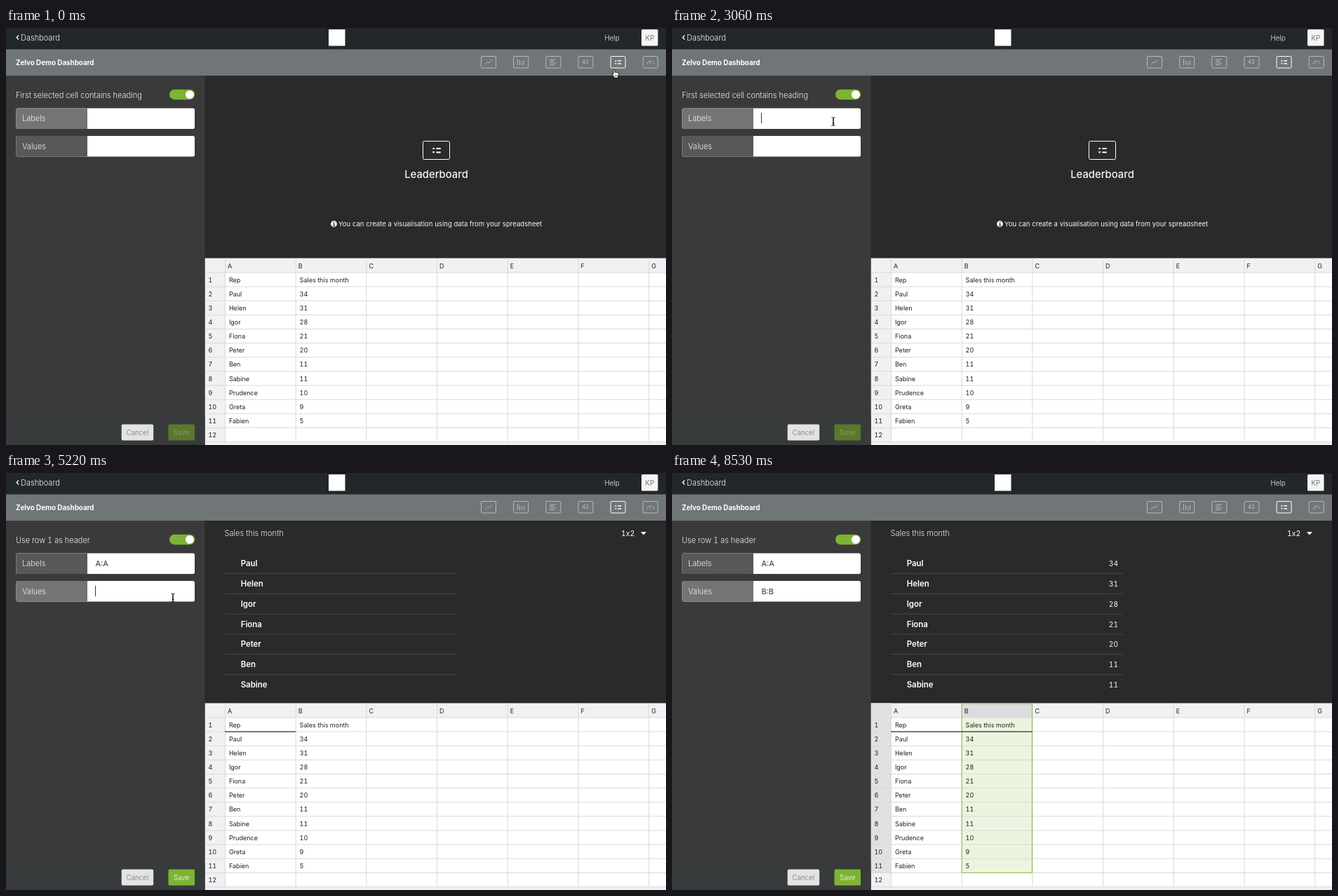
Write an HTML page that moves like this. It is 941x595 px and loops after 8.87 s.

```html
<!DOCTYPE html>
<html lang="en">
<head>
<meta charset="utf-8">
<title>Leaderboard set-up</title>
<style>
html, body { margin: 0; width: 100%; height: 100%; overflow: hidden; background: #2a2a2a; }
svg { display: block; width: 941px; height: 595px; }
text { font-family: Inter, "Liberation Sans", sans-serif; white-space: pre; }
.num { font-feature-settings: "tnum"; }
</style>
</head>
<body>
<svg id="stage" viewBox="0 0 941 595" xmlns="http://www.w3.org/2000/svg"></svg>
<script>
const LOOP = 8870;
const PICK_LABELS = 4010, FOCUS_VALUES = 5160, PICK_VALUES = 6310;
const people = [
  ['Paul', 34], ['Helen', 31], ['Igor', 28], ['Fiona', 21], ['Peter', 20], ['Ben', 11],
  ['Sabine', 11], ['Prudence', 10], ['Greta', 9], ['Fabien', 5]
];
const GREEN = '#7db433', LIGHT = '#747474', DARK = '#585858';

const rect = (x, y, w, h, fill, extra = '') =>
  `<rect x="${x}" y="${y}" width="${w}" height="${h}" fill="${fill}" ${extra}/>`;
const path = (d, stroke, width = 1, extra = '') =>
  `<path d="${d}" fill="none" stroke="${stroke}" stroke-width="${width}" ${extra}/>`;
const shape = (d, fill, extra = '') => `<path d="${d}" fill="${fill}" ${extra}/>`;
// Text is placed by the vertical middle of its capitals.
const label = (x, middle, str, size, fill, weight = 400, extra = '') =>
  `<text x="${x}" y="${(middle + size * 0.364).toFixed(2)}" font-size="${size}" fill="${fill}" font-weight="${weight}" ${extra}>${str}</text>`;
const group = (id, content) => `<g id="${id}">${content}</g>`;
const times = (n, fn) => Array.from({ length: n }, (_, i) => fn(i)).join('');
const centred = 'text-anchor="middle"';

const SHEET_TOP = 328.4;
const colX = i => 312.5 + i * 100.7;
const rowY = i => 349 + i * 20.13;
const rowMiddle = i => 359.3 + i * 20.15;

function leaderIcon(cx, cy, s, fill) {
  const p = (x, y) => `${cx + x * s} ${cy + y * s}`;
  const bar = y => rect(cx - 0.2 * s, cy + y * s, 6.4 * s, 2 * s, fill);
  return shape(`M${p(-6, -1.5)}L${p(-4, -4.3)}L${p(-2, -1.5)}ZM${p(-6, 1.6)}L${p(-4, 4.4)}L${p(-2, 1.6)}Z`, fill)
    + bar(-3.6) + bar(1.8);
}

function toolbar() {
  const grey = '#b6bbbc';
  const box = i => rect(677.5 + i * 46.15, 40.5, 21, 16.5, 'none',
    `rx="1.5" stroke="${i === 4 ? '#fff' : grey}"`);
  return times(6, box)
    + path('M683 52L686.5 48.5L689 49.5L693 45.5', grey)
    + times(4, i => path(`M${729.5 + i * 3} ${[44, 46, 48, 46][i]}V53`, grey))
    + times(4, i => path(`M775 ${45 + i * 2.5}h${[9, 6, 9, 7][i]}`, grey))
    + label(826, 48.7, '42', 7.5, grey, 500, centred)
    + leaderIcon(872.4, 48.8, 0.75, '#fff')
    + path('M914 52A5 5 0 0 1 924 52M919 51.5L917 48.5', grey, 0.9);
}

function header() {
  return rect(0, 0, 941, 31, '#22272a') + rect(0, 30.5, 941, 37.5, '#707677')
    + path('M18 10.5L15.2 13.5L18 16.5', '#fff', 1.3)
    + label(21, 13.5, 'Dashboard', 11, '#f4f4f4', 300)
    + rect(460, 2, 23.5, 23.5, '#fff')
    + label(853.5, 14, 'Help', 9.9, '#f0f0f0', 300)
    + rect(906, 2, 23.5, 23.5, '#f5f5f5', 'rx="1.5"')
    + label(917.8, 14, 'KP', 10, '#555', 300, centred)
    + label(14, 49.7, 'Zelvo Demo Dashboard', 9.8, '#fff', 700)
    + toolbar();
}

function field(id, y, name) {
  return rect(14.4, y, 254.6, 29.4, '#fff', 'rx="2.5"')
    + shape(`M116 ${y}H16.9a2.5 2.5 0 0 0-2.5 2.5v24.4a2.5 2.5 0 0 0 2.5 2.5H116Z`, DARK, `id="${id}Tile"`)
    + label(23, y + 14.6, name, 11, '#f0f0f0', 300);
}

function sidebar() {
  return rect(0, 68, 283.5, 527, '#3a3a3a') + rect(0, 556, 283.5, 39, '#373b3b')
    + group('headingBefore', label(14, 96, 'First selected cell contains heading', 11, '#ededed', 300))
    + group('headingAfter', label(14, 96, 'Use row 1 as header', 11, '#ededed', 300, 'class="num"'))
    + rect(233, 87.7, 36.2, 14.5, GREEN, 'rx="7.2"') + '<circle cx="261.9" cy="95" r="6" fill="#fff"/>'
    + field('labels', 114.5, 'Labels') + field('values', 154, 'Values')
    + group('labelsText', label(127.5, 129, 'A:A', 11, '#333'))
    + group('valuesText', label(127.5, 168.7, 'B:B', 11, '#333'))
    + rect(127, 121, 1, 15, '#333', 'id="caret"')
    + rect(164.7, 565.5, 45.5, 23, '#e3e3e3', 'rx="2"')
    + label(187.4, 577, 'Cancel', 9.8, '#777', 300, centred)
    + group('saveOff', rect(231.5, 565.5, 37.5, 23, '#5a782e', 'rx="2"')
      + label(250.2, 577, 'Save', 9.8, '#91a56d', 300, centred))
    + group('saveOn', rect(231.5, 565.5, 37.5, 23, GREEN, 'rx="2"')
      + label(250.2, 577, 'Save', 9.8, '#fff', 300, centred));
}

function preview() {
  const middle = i => 129 + i * 28.8;
  const intro = rect(594.5, 161.5, 38, 26, 'none', 'rx="2" stroke="#fff"')
    + leaderIcon(613.6, 174.6, 1, '#fff')
    + label(613.5, 208.5, 'Leaderboard', 14.8, '#f5f5f5', 500, centred)
    + '<circle cx="467.5" cy="279.5" r="4.4" fill="#fff"/>'
    + path('M467.6 276.3v1.4M466.4 279h1.3v3M466.2 282.2h2.8', '#2a2a2a', 1.2)
    + label(474, 279.5, 'You can create a visualisation using data from your spreadsheet', 9.6, '#f5f5f5');
  const board = label(311.5, 85.5, 'Sales this month', 11, '#e8e8e8', 300)
    + label(877, 86, '1x2', 10.4, '#fff', 400, 'class="num"')
    + shape('M905 84h8l-4 4.5Z', '#fff')
    + times(7, i => label(334.7, middle(i), people[i][0], 11.4, '#fff', 600))
    + times(6, i => path(`M312 ${143.5 + i * 28.8}H643`, '#474747'));
  const scores = times(7, i =>
    label(636, middle(i) + 0.5, people[i][1], 10.2, '#f5f5f5', 400, 'class="num" text-anchor="end"'));
  return rect(283.5, 68, 658, 261, '#2a2a2a')
    + group('intro', intro) + group('board', board) + group('scores', scores);
}

function sheet() {
  const ink = '#222', line = '#d9d9d9';
  const cells = [['Rep', 'Sales this month'], ...people];
  const bottom = rowY(11);
  const selection = col => group('select' + col,
    rect(283.5, SHEET_TOP, 29, bottom - SHEET_TOP, '#e1e1e4')
    + rect(colX(col), SHEET_TOP, 100.5, 349 - SHEET_TOP, '#dcdce0')
    + rect(colX(col), 349, 100.5, bottom - 349, '#ecf4df'));
  const outline = col => rect(colX(col), 329, 100.2, bottom - 329, 'none',
    `id="outline${col}" stroke="#8abb4a"`);
  return rect(283.5, SHEET_TOP, 658, 267, '#f1f1f3')
    + rect(312.5, 349, 629, rowY(12) - 349, '#fff')
    + selection(0) + selection(1)
    + times(13, i => path(`M283.5 ${rowY(i)}H941`, line))
    + times(7, i => path(`M${colX(i)} ${SHEET_TOP}V${rowY(12)}`, line))
    + times(7, i => label(colX(i) + 3.5, 339.3, 'ABCDEFG'[i], 9, ink))
    + times(12, i => label(288.5, rowMiddle(i), i + 1, 9, ink, 400, 'class="num"'))
    + cells.map((row, i) => row.map((v, col) =>
        label(colX(col) + 5.4, rowMiddle(i), v, 9.05, ink, 400, 'class="num"')).join('')).join('')
    + outline(0) + outline(1)
    + group('rule0', path('M312 369.2H413', '#333', 1.3))
    + group('rule1', path('M413 369.2H513.5', '#333', 1.3));
}

const tooltip = group('tooltip', rect(872.3, 66.7, 56.5, 13.8, '#ececec', 'stroke="#bbb" stroke-width=".5"')
  + label(876, 73.7, 'Leaderboard', 7.9, '#222'));

const pointers = group('arrow',
    '<path d="M0 0V11L2.6 8.6L4.2 12.4L6 11.6L4.4 8H7.8Z" fill="#000" stroke="#fff" stroke-width=".9"/>')
  + group('beam', path('M-2.5-6Q0-6 0-4.5V4.5Q0 6-2.5 6M2.5-6Q0-6 0-4.5V4.5Q0 6 2.5 6M-1.3 2.5H1.3', '#111', 1))
  + group('hand', '<path d="M-1 1Q0-.8 1 1V4.5L2.2 4L3.4 4.7L4.6 4.4L5.6 5.2L6.7 5.4V8L5.6 10.3V12H-.2V10.6L-3 6.8Q-2.6 5.4-1 7Z" fill="#fff" stroke="#000" stroke-width=".8"/>'
    + path('M1.6 8v2M3.2 8v2M4.8 8v2', '#000', 0.6));

const stage = document.getElementById('stage');
stage.innerHTML = preview() + sheet() + sidebar() + header() + tooltip + pointers;
const el = id => document.getElementById(id);
const show = (id, on) => el(id).setAttribute('display', on ? 'inline' : 'none');

// Pointer moves: start, end, number of steps, evenly timed way points.
const moves = [
  [0, 0, 1, [[867, 59]]],
  [60, 60, 1, [[868.5, 58]]],
  [240, 240, 1, [[871, 54]]],
  [1520, 2330, 15, [[871, 54], [858, 66], [816, 118], [650, 175], [460, 187], [320, 178], [265, 157]]],
  [2420, 2530, 3, [[265, 157], [243, 140], [229, 131]]],
  [3060, 3590, 10, [[229, 131], [231, 136], [262, 200], [312, 290], [331, 334], [334.5, 340]]],
  [4490, 4490, 1, [[334.5, 339.3]]],
  [4640, 5220, 10, [[334.5, 339], [325, 318], [288, 250], [253, 200], [240, 181], [238, 178]]],
  [5520, 6190, 11, [[238, 178], [246, 186], [300, 232], [385, 300], [432, 334], [444.5, 341.5]]],
  [7810, 8290, 8, [[444.5, 341.5], [475, 362], [610, 440], [780, 530], [880, 584], [915, 600]]],
  [8470, 8470, 1, [[940, 593]]],
  [8530, 8530, 1, [[960, 610]]]
];

function pointerAt(t) {
  const [start, end, steps, points] = moves.filter(m => m[0] <= t).pop();
  if (steps === 1) return points[0];
  const step = Math.min(steps - 1, Math.floor((t - start) / (end - start) * (steps - 1) + 1e-6));
  const at = (step + 1) / steps * (points.length - 1);
  const i = Math.min(points.length - 2, Math.floor(at));
  return points[i].map((v, axis) => v + (points[i + 1][axis] - v) * (at - i));
}

function drawPointer(t) {
  const [x, y] = pointerAt(t);
  const inField = x > 116 && x < 269 && ((y > 114 && y < 144) || (y > 154 && y < 184));
  const kind = y < 66 ? 'hand' : inField ? 'beam' : 'arrow';
  for (const id of ['hand', 'beam', 'arrow']) show(id, id === kind);
  el(kind).setAttribute('transform', `translate(${x.toFixed(1)} ${y.toFixed(1)})`);
}

function drawCaret(t) {
  const onValues = t >= FOCUS_VALUES;
  const since = t - (onValues ? FOCUS_VALUES : 2820);
  const focused = onValues ? t < PICK_VALUES : t < PICK_LABELS;
  show('caret', focused && since >= 0 && since % 1005 < 503);
  el('caret').setAttribute('y', onValues ? 161 : 121);
}

function render(t) {
  const picked = t >= PICK_LABELS, done = t >= PICK_VALUES, onValues = t >= FOCUS_VALUES;
  for (const id of ['intro', 'headingBefore', 'saveOff']) show(id, !picked);
  for (const id of ['board', 'headingAfter', 'saveOn', 'labelsText', 'rule0']) show(id, picked);
  for (const id of ['scores', 'valuesText', 'rule1', 'select1', 'outline1']) show(id, done);
  for (const id of ['select0', 'outline0']) show(id, picked && !onValues);
  el('labelsTile').setAttribute('fill', onValues ? DARK : LIGHT);
  el('valuesTile').setAttribute('fill', onValues ? LIGHT : DARK);
  show('tooltip', t >= 1260 && t < 1760);
  drawCaret(t);
  drawPointer(t);
}

const begin = performance.now();
function tick() {
  render((performance.now() - begin) % LOOP);
  requestAnimationFrame(tick);
}
tick();
</script>
</body>
</html>
```
